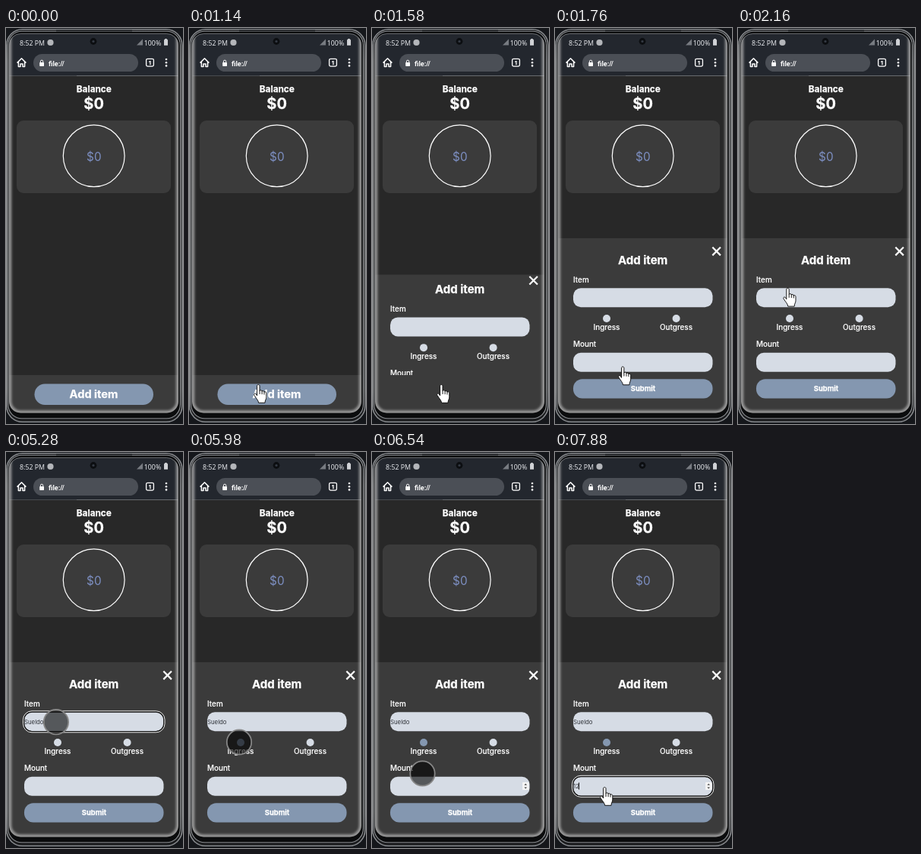
An HTML page for the animation above (8 s loop, 233 by 518 pixels).

```html
<!DOCTYPE html>
<html lang="en">
<head>
<meta charset="utf-8">
<title>Balance</title>
<style>
  html, body { margin: 0; width: 100%; height: 100%; overflow: hidden; background: #15171b; }
  svg { display: block; width: 233px; height: 518px; }
  text { font-family: Inter, sans-serif; fill: #fff; }
  .mid { text-anchor: middle; }
  .b { font-weight: 700; stroke: #fff; stroke-width: .25px; }
  .label { font-size: 9.9px; font-weight: 500; stroke: #fff; stroke-width: .15px; }
  .bar { font-family: "Noto Sans", sans-serif; font-size: 8.8px; fill: #e4e6ea; }
  .typed { font-size: 7.8px; fill: #30343a; }
  .field { fill: #d6dce5; }
  .blue { fill: #8497b0; }
  .panel { fill: #3b3b3b; }
  .line { fill: none; stroke: #fff; }
</style>
</head>
<body>
<svg viewBox="0 0 233 518">
  <defs>
    <filter id="soft" x="-10%" width="120%" y="-5%" height="110%"><feGaussianBlur stdDeviation="1.6"/></filter>
    <linearGradient id="metal" x2="0" y2="1">
      <stop offset="0" stop-color="#85888c"/>
      <stop offset=".08" stop-color="#a9abad"/>
      <stop offset=".92" stop-color="#a9abad"/>
      <stop offset="1" stop-color="#85888c"/>
    </linearGradient>
    <clipPath id="screen"><rect x="4" y="7" width="223" height="496.5" rx="15"/></clipPath>
    <clipPath id="reveal"><rect id="clip" x="4" y="275" width="223" height="228"/></clipPath>
  </defs>

  <!-- phone body -->
  <rect x=".7" y="1.7" width="231.2" height="513.6" rx="21" fill="#1b1c1e" stroke="url(#metal)" stroke-width="1.4"/>
  <rect x="2.8" y="4.2" width="226.6" height="506.6" rx="18" fill="#0b0c0d" stroke="url(#metal)" stroke-width="1.1"/>
  <path d="M66 3.5H166" stroke="#26282b" stroke-width="2"/>

  <g clip-path="url(#screen)">
    <rect x="4" y="7" width="223" height="56" fill="#23272e"/>
    <rect x="4" y="63" width="223" height="441" fill="#282828"/>

    <!-- status bar and toolbar -->
    <text class="bar" x="18" y="22.5">8:52 PM</text>
    <circle cx="58.5" cy="19" r="4.1" fill="#b4b6ba"/>
    <circle cx="115" cy="17.5" r="4.4" fill="#0c0e11"/>
    <circle cx="115" cy="17.5" r="1.6" fill="#343a44"/>
    <path d="M180 14.5V22.5H172Z" fill="#777b81"/>
    <text class="bar" x="181.8" y="22.5">100%</text>
    <path d="M209.2 14h2.6v1.2h1.2v7.5h-5v-7.5h1.2z" fill="#d0d2d6"/>
    <path class="line" stroke-width="1.5" stroke-linejoin="round" d="M14.6 45.6L20.5 39.8L26.4 45.6M16.4 44.6V50.5H19V47H22V50.5H24.6V44.6"/>
    <rect x="36" y="34" width="138" height="23" rx="11.5" fill="#4b4f56"/>
    <rect x="44.2" y="45" width="5.8" height="5" rx=".7" fill="#fff"/>
    <path class="line" d="M45.4 45.5V43.8a1.7 1.7 0 0 1 3.4 0V45.5"/>
    <text x="56" y="49.5" style="font:700 9px Roboto,sans-serif">file://</text>
    <rect class="line" x="184.6" y="40.3" width="9.8" height="9.8" rx="1.8" stroke-width="1.3"/>
    <text class="mid b" x="189.5" y="47.7" font-size="6.5">1</text>
    <g fill="#fff"><circle cx="211" cy="41" r="1.3"/><circle cx="211" cy="45.2" r="1.3"/><circle cx="211" cy="49.4" r="1.3"/></g>
    <path d="M4 62.5H93" stroke="#484b4f"/>
    <path d="M93 62.5H227" stroke="#686b6f"/>

    <!-- balance -->
    <text class="mid b" x="115.8" y="84" font-size="11.8">Balance</text>
    <text class="mid b" x="115.6" y="106" font-size="20">$0</text>
    <rect class="panel" x="14" y="121" width="203" height="95" rx="9"/>
    <circle class="line" cx="115.7" cy="167.3" r="40.4" stroke-width="1.2"/>
    <text class="mid" x="115.8" y="174" font-size="15.3" style="fill:#7d8fc2">$0</text>

    <!-- bottom panel -->
    <rect id="panel" class="panel" x="4" y="454" width="223" height="50"/>
    <g id="add">
      <rect class="blue" x="37.5" y="465.5" width="156.5" height="27.5" rx="13.7"/>
      <text class="mid b" x="115.5" y="484.2" font-size="14.7">Add item</text>
    </g>
    <g id="form" clip-path="url(#reveal)">
      <g id="content">
        <path class="line" stroke-width="2.2" d="M207.3 286.8L217.9 297.4M217.9 286.8L207.3 297.4"/>
        <text class="mid b" x="115.6" y="309" font-size="15">Add item</text>
        <text class="label" x="24" y="333">Item</text>
        <rect class="field" x="24" y="340.3" width="183.5" height="25" rx="10"/>
        <circle id="ingress" cx="68" cy="380" r="5"/>
        <circle class="field" cx="159.6" cy="380" r="5"/>
        <text class="label mid" x="68" y="395">Ingress</text>
        <text class="label mid" x="159.5" y="395">Outgress</text>
        <text class="label" x="24" y="417">Mount</text>
        <rect class="field" x="24" y="424.8" width="183.5" height="25" rx="10"/>
        <rect class="blue" x="24" y="459.3" width="183.5" height="25.2" rx="12"/>
        <text class="mid b" x="116" y="475.3" font-size="9.4">Submit</text>
      </g>
    </g>
    <g id="ring" fill="none">
      <rect x="23.6" y="339.9" width="184.3" height="25.8" rx="10.4" stroke="#111" stroke-width="1.5"/>
      <rect x="22.5" y="338.8" width="186.5" height="28" rx="11.5" stroke="#fff" stroke-width=".9"/>
    </g>
    <g id="spin">
      <rect x="198" y="432" width="8.5" height="10" rx=".8" fill="#f4f4f4"/>
      <path d="M200.4 435.8L202.2 433.8L204 435.8ZM200.4 438.4L202.2 440.4L204 438.4Z" fill="#444"/>
    </g>
    <text id="name" class="typed" x="24" y="355.8"></text>
    <text id="sum" class="typed" x="24" y="440.2"></text>
    <rect id="caret" width="1" height="9" fill="#111"/>

    <!-- curved glass edge -->
    <rect x="5.2" y="-20" width="220.6" height="522.3" rx="14" fill="none" stroke="#bbb" stroke-opacity=".75" stroke-width="4" filter="url(#soft)"/>
    <rect x="4.5" y="7.5" width="222" height="495.5" rx="15" fill="none" stroke="#aaa" stroke-opacity=".5"/>
  </g>

  <g id="touch">
    <circle r="16.2" fill="#000" fill-opacity=".6" stroke="#868686" stroke-width="1.8"/>
  </g>
  <g id="hand" stroke="#000" stroke-width=".9" stroke-linejoin="round" stroke-linecap="round">
    <path fill="#fff" d="M4.6 14.5V2.2C4.6 0 8 0 8 2.2V8.6C8.5 7.4 11 7.5 11.1 9.2C11.8 8.2 13.9 8.6 14 10.2C14.9 9.4 16.8 10 16.8 11.6V16.8C16.8 19.6 15 20.8 15 24.3H6.6C6.5 21.4 3.6 18.8 .9 14.4C0 12.6 1.9 11.3 3.2 12.7Z"/>
    <path fill="none" d="M8 8.6V12.6M11.1 9.2V12.8M14 10.2V13.2"/>
  </g>
</svg>
<script>
const LOOP = 8000;
const el = id => document.getElementById(id);
const set = (id, attrs) => { for (const k in attrs) el(id).setAttribute(k, attrs[k]); };
const show = (id, on) => { el(id).style.display = on ? "" : "none"; };
const clamp = v => Math.min(1, Math.max(0, v));
const part = (t, a, b) => clamp((t - a) / (b - a));
const lerp = (a, b, p) => a + (b - a) * p;
const between = (t, a, b) => t >= a && t < b;

const ease = {
  line: p => p,
  in: p => p * p,
  out: p => 1 - (1 - p) ** 2,
  both: p => p * p * (3 - 2 * p)
};

// moves: [start, end, x, y, easing]
const handMoves = [
  [560, 820, 89.5, 465, "out"],
  [1040, 1140, 85, 466, "both"],
  [1620, 1760, 83, 443, "in"],
  [1760, 2200, 59, 339, "out"],
  [6640, 6641, 59, 438, "line"]
];
const touchMoves = [
  [5200, 5280, 66, 353, "in"],
  [5280, 5520, 57.5, 379.5, "out"],
  [5700, 5820, 66, 379.5, "both"],
  [6320, 6540, 66.5, 420, "in"],
  [6540, 6640, 66, 444.5, "out"]
];

function follow(moves, x, y, t) {
  for (const [a, b, nx, ny, kind] of moves) {
    if (t < a) break;
    const p = ease[kind](part(t, a, b));
    x = lerp(x, nx, p);
    y = lerp(y, ny, p);
  }
  return `translate(${x.toFixed(2)} ${y.toFixed(2)})`;
}

const typed = (word, times, t) => word.slice(0, times.filter(k => t >= k).length);

function drawPanel(t) {
  const open = t >= 1420;
  const p = part(t, 1420, 1720);
  const top = lerp(454, 275, 1 - (1 - p) ** 1.72);
  const bottom = lerp(454, 504, part(t, 1600, 1720));
  set("panel", { y: top, height: 504 - top });
  set("clip", { y: top, height: Math.max(0, bottom - top) });
  set("content", { transform: `translate(0 ${(top - 275) * 0.8})` });
  show("add", !open);
  show("form", open);
}

function drawForm(t) {
  const onItem = between(t, 2560, 5980);
  const onMount = t >= 6920;
  el("name").textContent = typed("Sueldo", [3520, 3940, 4120, 4200, 4340, 4460], t);
  el("sum").textContent = typed("12", [7820, 7880], t);
  set("ingress", { class: t >= 5980 ? "blue" : "field" });
  show("ring", onItem || onMount);
  set("ring", { transform: `translate(0 ${onMount ? 84.5 : 0})` });
  show("spin", t >= 6520);

  const blank = between(t, 3080, 3520) || between(t, 5000, 5500) || between(t, 7440, 7820);
  const box = el(onMount ? "sum" : "name");
  const w = box.textContent ? box.getComputedTextLength() : 0;
  set("caret", { x: Math.floor(24 + w), y: onMount ? 432.5 : 348.5 });
  show("caret", (onItem || onMount) && !blank);
}

function drawPointer(t) {
  const touching = between(t, 2420, 6920);
  show("touch", touching);
  show("hand", t >= 560 && !touching);
  set("touch", { transform: follow(touchMoves, 66, 346, t) });
  set("hand", { transform: follow(handMoves, 233, 400, t) });
}

function draw(t) {
  drawPanel(t);
  drawForm(t);
  drawPointer(t);
}

const start = performance.now();
function tick() {
  draw((performance.now() - start) % LOOP);
  requestAnimationFrame(tick);
}
tick();
</script>
</body>
</html>
```
